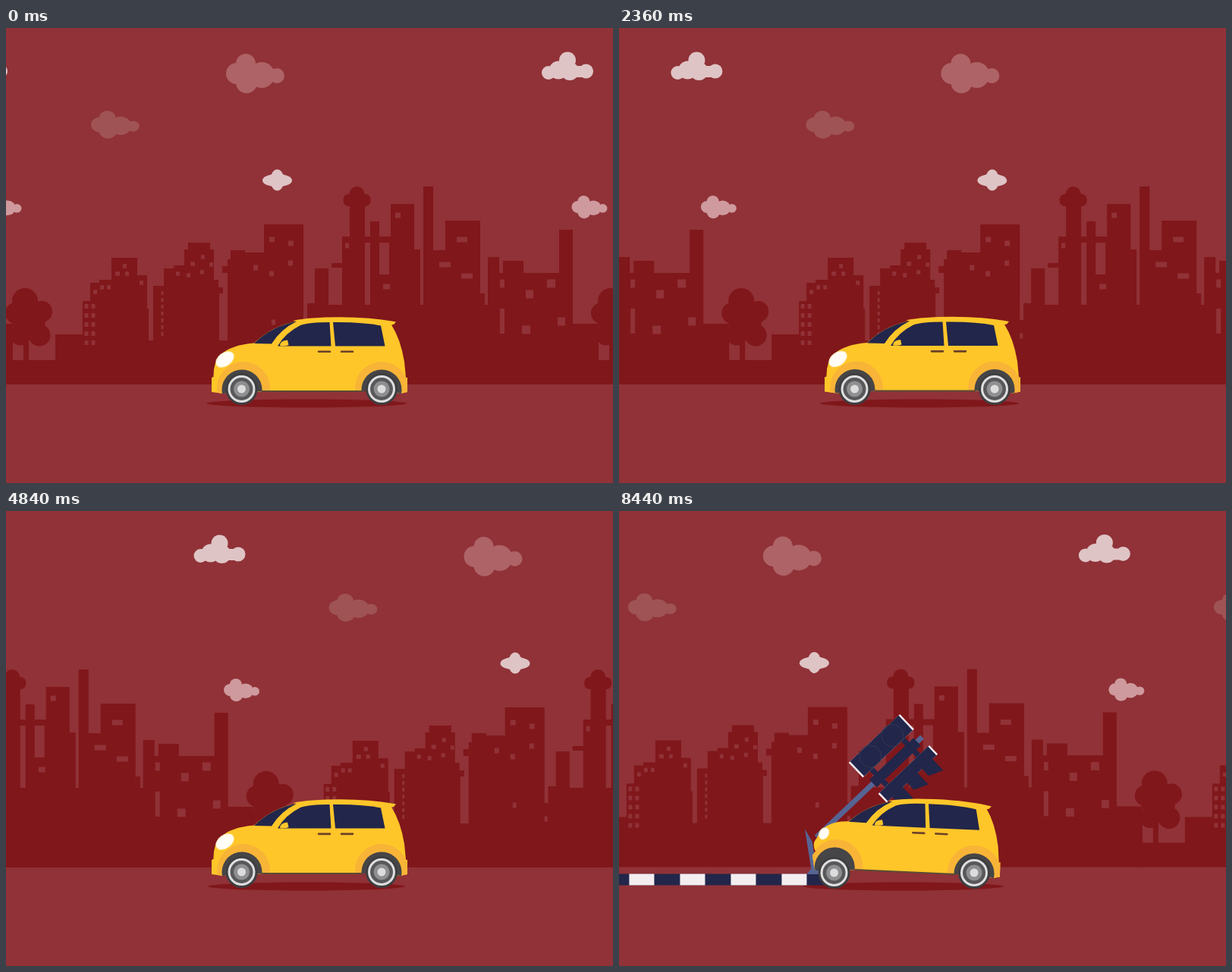
Recreate the animation shown at these times as an HTML page. Size 800 by 600 pixels, loop 8.52 s.

```html
<!DOCTYPE html>
<html lang="en">
<head>
<meta charset="utf-8">
<title>Yellow car</title>
<style>
  html, body { margin: 0; width: 100%; height: 100%; overflow: hidden; background: #903237; }
  svg { display: block; width: 800px; height: 600px; }
  .dark { fill: #80171b; }
  .gap { fill: #903237; }
  .panes { fill: none; stroke: #903237; }
  .navy { fill: #22264a; }
  .steel { fill: #566494; }
  .yellow { fill: #ffc629; }
</style>
</head>
<body>
<svg viewBox="0 0 800 600">
  <defs>
    <g id="tree" class="dark">
      <path d="M23 400H30V440H23Z"/>
      <circle cx="25" cy="360" r="17"/>
      <circle cx="13" cy="376" r="14"/>
      <circle cx="47" cy="374" r="14"/>
      <circle cx="19" cy="405" r="13.500"/>
      <circle cx="44" cy="405" r="14.500"/>
      <circle cx="30" cy="386" r="22"/>
    </g>

    <g id="skyline">
      <g class="dark">
        <path d="M0 470V438H65V404H102V412H297V385H397V365H625V350H631V365H636V323H730V390H781V470Z"/>
        <path d="M101 420V360H111V336H123V332H139V303H173V326H186V370H188V420Z"/>
        <path d="M194 420V340H208V317H221V313H235V292H240V283H269V292H274V332H280V342H286V350H281V420Z"/>
        <path d="M292 420V323H285V314H292V305H296V293H315V296H340V259H392V420Z"/>
        <path d="M397 400V363H407V317H425V400Z"/>
        <path d="M429 316V310H443V275H453V225H473V275H480V255H492V275H507V232H538V292H546V400H443V316Z"/>
        <path d="M550 400V209H563V293H579V254H625V400Z"/>
        <path d="M635 400V302H650V323H655V307H682V323H729V266H747V400Z"/>
        <rect x="444.500" y="219" width="36" height="16" rx="7"/>
        <circle cx="462.500" cy="219" r="10"/>
      </g>
      <path class="gap" d="M473 283h7v82h-7zM492 283h13v42h-13z"/>
      <g class="panes">
        <path stroke-width="5" stroke-dasharray="6 6" d="M106 364V420M115 364V420"/>
        <path stroke-width="3" stroke-dasharray="5 4" d="M206 347V408"/>
        <path stroke-width="5.500" d="M115 348h5M124 342h5m4 0h5M144 324h6m7 0h5M154 314h5M176 336h5"/>
        <path stroke-width="5.500" d="M224 324h5m9 2h5M243 311h6M257 302h5M268 312h5M256 322h5"/>
        <path stroke-width="7" d="M347 279h7m18 5h7M326 316h6m15 8h6M372 310h6M350 388h5M392 406h4"/>
        <path stroke-width="7" d="M447 287h5M513 247h7M497 341h9M594 279h14M571 312h15m14 15h15"/>
        <path stroke-width="11" d="M651 337h6m28 14h10m18 -14h11M680 398h11m36 -11h10"/>
        <path stroke-width="6" d="M654 370V403"/>
      </g>
      <use href="#tree"/>
    </g>

    <!-- one puffy shape, 77 by 52, reused at three sizes -->
    <g id="puff">
      <circle cx="26" cy="13" r="13"/>
      <circle cx="14" cy="26" r="14"/>
      <circle cx="27" cy="38" r="14"/>
      <circle cx="47" cy="28" r="17"/>
      <circle cx="67" cy="29" r="10"/>
    </g>
    <g id="sky">
      <use href="#puff" fill="#ae6366" transform="translate(290 34)"/>
      <use href="#puff" fill="#9f5354" transform="translate(112 109) scale(.83 .71)"/>
      <use href="#puff" fill="#cf9a9d" transform="translate(745.500 221) scale(.61 .58)"/>
      <g fill="#dfc4c6">
        <circle cx="740" cy="42.500" r="11"/>
        <circle cx="715" cy="59" r="9"/>
        <circle cx="728" cy="55.500" r="12"/>
        <circle cx="743" cy="57" r="12"/>
        <circle cx="764.500" cy="57" r="9.500"/>
        <path d="M728 50H762V65H728Z"/>
        <ellipse cx="357.500" cy="200.500" rx="9" ry="14"/>
        <ellipse cx="357.500" cy="201" rx="19.500" ry="8.500"/>
      </g>
    </g>

    <clipPath id="bodyClip"><path class="shell"/></clipPath>
    <g id="wheel">
      <circle r="21" fill="#3e3d3f"/>
      <circle r="18" fill="#e0dfdf"/>
      <circle r="15" fill="#58575a"/>
      <circle r="10.500" fill="#8f8e90"/>
      <circle r="5.500" fill="#dddcdc"/>
    </g>
    <path id="visor" d="M30 252H51L43 271H30Z"/>
  </defs>
  <rect class="gap" width="800" height="600"/>

  <g id="scene">
    <g id="clouds"><use href="#sky" x="-772"/><use href="#sky"/><use href="#sky" x="772"/></g>
    <g id="city"><use href="#skyline" x="-772"/><use href="#skyline"/><use href="#skyline" x="772"/></g>
  </g>

  <ellipse id="shadow" class="dark" cy="495" ry="5.500"/>

  <g id="signal">
    <path class="navy" d="M-340 478.500H24V493.500H-340Z"/>
    <path d="M31.500 486H-340" stroke="#f4eef0" stroke-width="15" stroke-dasharray="8 34 33"
      id="stripes"/>
    <path class="steel" d="M-10 479L-3.500 471H3.500L10 479Z"/>
    <path class="steel" id="stump" d="M-3.500 418L3.500 436V476H-3.500Z"/>
    <g id="mast">
      <path class="steel" d="M-3.500 242H3.500V434H-3.500Z"/>
      <path class="navy" d="M-16 259H16V266H-16ZM-16 316H16V323H-16ZM-7 251H7V331H-7Z"/>
      <path fill="#f4eef0" d="M14.500 242.500H30.500V335.500H14.500ZM-42 242.500H-15V335.500H-42Z"/>
      <path class="navy" d="M14.500 245H30.500V333H14.500ZM-42 245H-15V333H-42Z"/>
      <g fill="none" stroke="#393a54" stroke-width=".8">
        <circle cx="-28.500" cy="269" r="14.500"/>
        <circle cx="-28.500" cy="309" r="14.500"/>
      </g>
      <g class="navy"><use href="#visor"/><use href="#visor" y="27"/><use href="#visor" y="54"/></g>
    </g>
  </g>

  <g id="car">
    <g id="body">
      <path class="shell yellow"/>
      <g clip-path="url(#bodyClip)">
        <circle cx="313" cy="475" r="35" fill="#f8b437"/>
        <circle cx="495" cy="475" r="35" fill="#f8b437"/>
        <circle cx="311" cy="477" r="26.500" fill="#464547"/>
        <circle cx="495" cy="477" r="26.500" fill="#464547"/>
      </g>
      <path d="M337 479H470" stroke="#5c4a35" stroke-width="2"/>
      <path class="navy" d="M327 416Q350 393 383 387Q362 397 350 416.500Z"/>
      <path class="navy" d="M358 419.500Q368 402 388 392Q400 388 426.500 388L428.500 419.500Z"/>
      <path class="navy" d="M431 388Q470 387.500 494 392.500L499.500 419.500H434Z"/>
      <path class="yellow" d="M361 419Q361 412 371 411.500L372.500 418Q368 420 361 419Z"/>
      <path d="M412 426.800H427M442 426.800H457" stroke="#6b4028" stroke-width="2.600" stroke-linecap="round"/>
      <ellipse id="lamp" fill="#fffdf5" stroke="#ffefc0"/>
    </g>
    <use href="#wheel" x="310.500" y="476"/>
    <use href="#wheel" x="495" y="476"/>
  </g>
</svg>

<script>
const FRAME = 40, LOOP = 8520, LAP = 50;
const CRASH = 195, LAST = 211;

const $ = id => document.getElementById(id);
const clamp = v => Math.max(0, Math.min(1, v));
const mix = (a, b, k) => a + (b - a) * k;
const move = (id, value) => $(id).setAttribute('transform', value);
const shells = document.querySelectorAll('.shell');

function set(id, attrs) {
  for (const key in attrs) $(id).setAttribute(key, attrs[key]);
}

// The kerb ends in a narrow white strip; wide stripes repeat to the left.
function stripeKerb() {
  let d = 'M23.5 486h8';
  for (let x = -43; x > -320; x -= 67) d += `M${x} 486h33`;
  $('stripes').removeAttribute('stroke-dasharray');
  $('stripes').setAttribute('d', d);
}

// k crumples the nose from 0 to 1
function shapeBody(k) {
  const p = (x, y, x2, y2) => `${mix(x, x2, k)} ${mix(y, y2, k)}`;
  const d = `M${p(271, 480, 284, 478)}L${p(271, 461, 281, 462)}L${p(273.5, 460, 285, 457)}`
    + `Q${p(273, 441, 279, 447)} ${p(283, 431, 286, 439)}Q${p(296, 418, 294, 416)} 327 415.5`
    + 'Q352 392 383 387L378 386Q400 381.3 440 381.3Q484 381.5 514 387.5L511 391L508 391.5'
    + 'Q520 410 525 440L527 461H529V480L520 482L500 479H340L286 482Z';
  for (const s of shells) s.setAttribute('d', d);
  const cx = mix(288.5, 295, k), cy = mix(437, 433, k);
  set('lamp', { cx, cy, rx: mix(13, 8, k), ry: mix(8.5, 6, k) });
  move('lamp', `rotate(${mix(-36, -62, k)} ${cx} ${cy})`);
}

function draw(f) {
  const run = Math.min(f, CRASH), lap = run % LAP;
  const after = Math.max(0, f - CRASH);
  move('scene', `translate(0 ${after ? -0.6 : 0})`);
  move('clouds', `translate(${lap * 14.93} 0)`);
  move('city', `translate(${lap * 15.13} 0)`);

  const fall = clamp((after - 1) / 11) ** 1.7;
  move('signal', `translate(${7.5 + (run - 179) * 15.62} 0)`);
  move('mast', `translate(${3.5 * fall} ${-3.5 * fall}) rotate(${46.5 * fall} 0 433)`);
  move('stump', `rotate(${-9 * clamp((after - 1) / 3)} 0 476)`);

  const lift = after ? 0 : (1 - Math.cos(f * Math.PI / 7)) / 2;
  const push = clamp(after / 2), crush = clamp((after - 1) / 2);
  const tilt = 2.5 * crush + 1.5 * Math.sin(Math.PI * clamp((after - 2) / 6));
  move('car', `translate(${-27 * push} ${push})`);
  move('body', `translate(0 ${-1.2 * lift}) rotate(${tilt} 495 478)`);
  shapeBody(crush);
  set('shadow', { cx: 396 - 21 * push, rx: 132 - 2.5 * lift });
}

stripeKerb();

const start = performance.now();
function tick() {
  const t = (performance.now() - start) % LOOP;
  draw(Math.min(LAST, Math.floor(t / FRAME)));
  requestAnimationFrame(tick);
}
tick();
</script>
</body>
</html>
```
